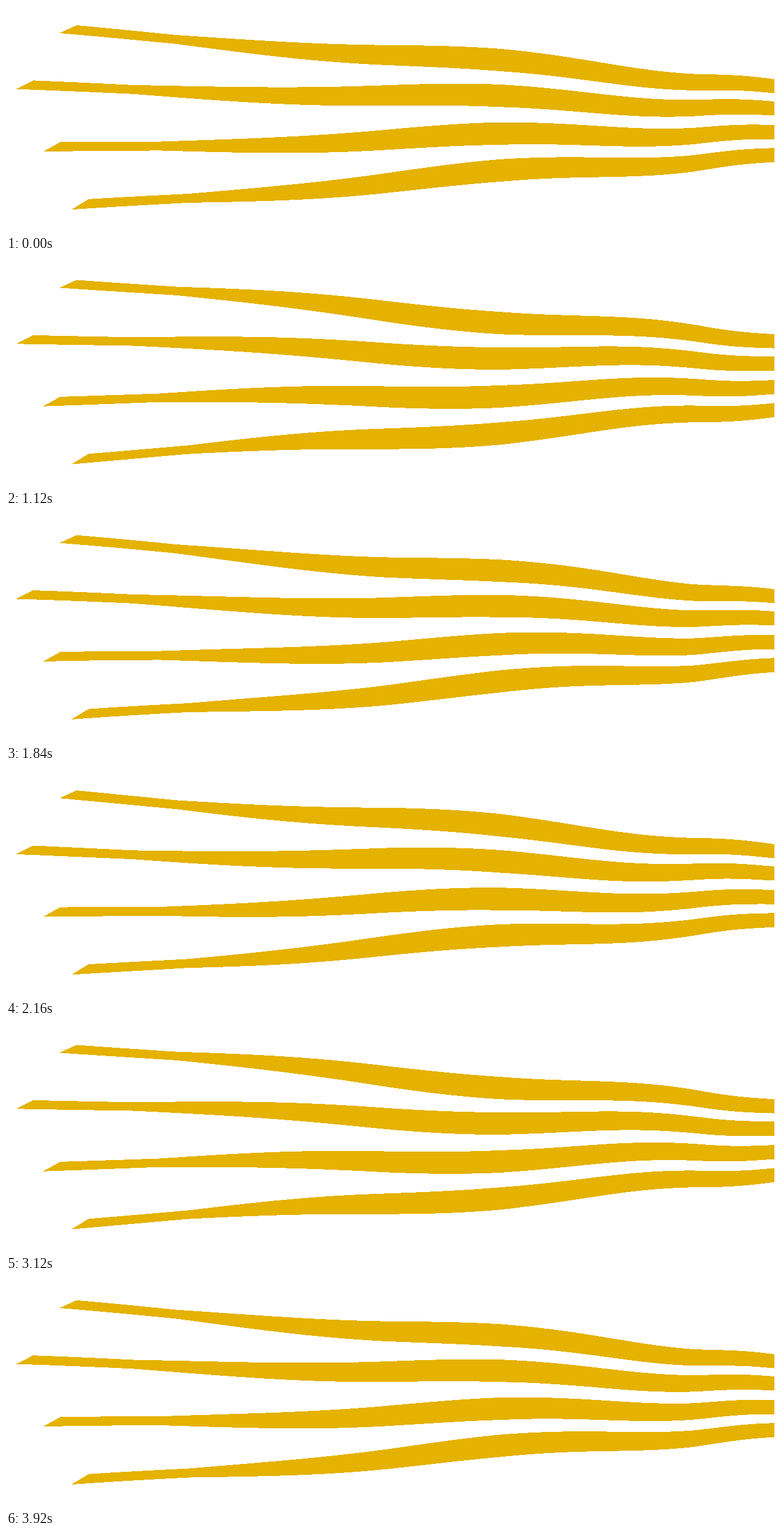
These frames come from a looping animation (1280x376 px, 3.96 s). An HTML page:

```html
<!DOCTYPE html>
<html lang="en">
<head>
<meta charset="utf-8">
<title>Waving ribbons</title>
<style>
  html, body { margin: 0; width: 100%; height: 100%; overflow: hidden; background: #fff; }
  svg { display: block; }
</style>
</head>
<body>
<svg id="stage" width="1280" height="376" fill="#e5b200" shape-rendering="crispEdges"></svg>
<script>
const LOOP = 3960, PERIOD = 2000, STEP = 40;
const END = 1274, PEAK = 820, BEVEL = 28.5, SAMPLES = 300;
const svg = document.getElementById('stage');

// Each ribbon follows a straight axis from its left end to END.
const ribbons = [
  { x: 117, y: 39.4, endY: 132.9 },
  { x: 45, y: 130.8, endY: 169.8 },
  { x: 90, y: 232.8, endY: 208.8 },
  { x: 137, y: 327.3, endY: 247 }
];

const mix = (a, b, u) => a + (b - a) * u;

// Even at the tail, swelling to PEAK, then tapering to the right end.
function thickness(x, start) {
  const knee = start + 165;
  if (x < knee) return mix(15.2, 14.5, (x - start) / (knee - start));
  if (x < PEAK) return mix(14.5, 37.2, Math.sin((x - knee) / (PEAK - knee) * Math.PI / 2));
  return mix(37.2, 23.4, (x - PEAK) / (END - PEAK));
}

// The wave grows from the tail, fades with distance and is pinned at END.
function amplitude(x, start) {
  if (x < 630) return mix(0.5, 7.9, (x - start) / (630 - start));
  if (x < 1140) return mix(7.9, 4.8, (x - 630) / 510);
  return mix(4.8, 0, (x - 1140) / (END - 1140));
}

// Waves shorten towards the right, as if receding.
function phase(x, start) {
  const degrees = 519 - 917000 / (2150 - x) + 0.17 * (start - 117);
  return degrees * Math.PI / 180;
}

function edge(ribbon, side) {
  const start = side < 0 ? ribbon.x : ribbon.x - BEVEL;
  return Array.from({ length: SAMPLES + 1 }, (_, i) => {
    const x = mix(start, END, i / SAMPLES);
    const axis = mix(ribbon.y, ribbon.endY, (x - ribbon.x) / (END - ribbon.x));
    return {
      x,
      y: axis + side * thickness(x, ribbon.x) / 2,
      amp: amplitude(x, start),
      phase: phase(x, start)
    };
  });
}

for (const ribbon of ribbons) {
  ribbon.outline = [...edge(ribbon, -1), ...edge(ribbon, 1).reverse()];
  ribbon.path = document.createElementNS(svg.namespaceURI, 'path');
  svg.append(ribbon.path);
}

function draw(ms) {
  const angle = ms / PERIOD * 2 * Math.PI;
  for (const { outline, path } of ribbons) {
    const points = outline.map(p =>
      p.x.toFixed(2) + ' ' + (p.y + p.amp * Math.cos(angle - p.phase)).toFixed(2));
    path.setAttribute('d', 'M' + points.join('L') + 'Z');
  }
}

let begin;
function tick(now) {
  begin ??= now;
  const t = (now - begin) % LOOP;
  draw(Math.floor(t / STEP) * STEP);
  requestAnimationFrame(tick);
}
draw(0);
requestAnimationFrame(tick);
</script>
</body>
</html>
```
